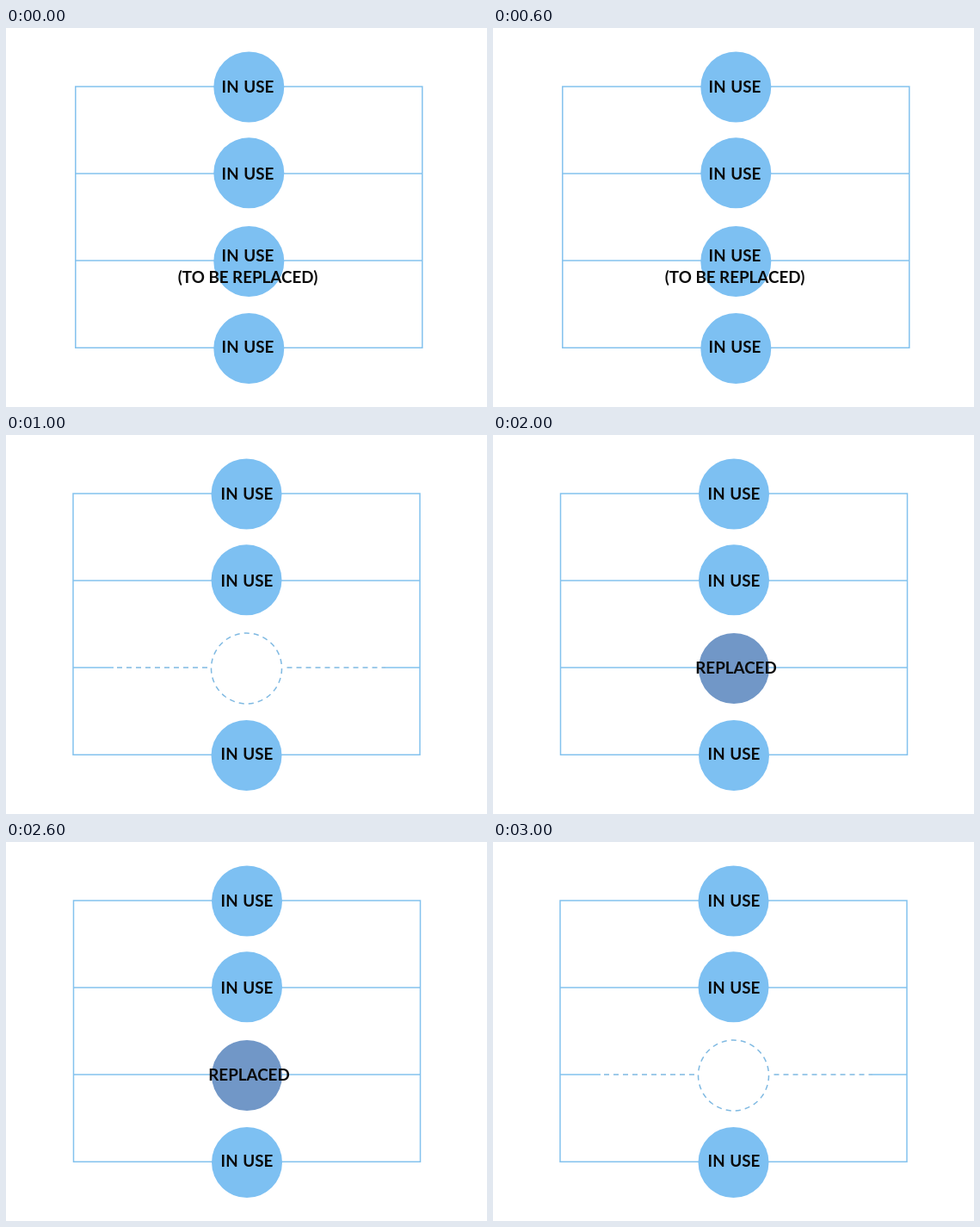
Write an HTML page that moves like this. It is 559 px wide and 440 px high and loops after 4 s.

```html
<!DOCTYPE html>
<html lang="en">
<head>
<meta charset="utf-8">
<title>Replacing one of four units</title>
<style>
html, body { margin: 0; width: 100%; height: 100%; overflow: hidden; background: #fff; }
svg { display: block; }
.wire { fill: none; stroke: #83c2ee; stroke-width: 1.5; }
.dash { stroke: #7fb9e2; stroke-dasharray: 6 5; }
text { font: 700 18.8px Lato, Carlito, sans-serif; text-anchor: middle; fill: #0a0a0a; }
.use { word-spacing: 1.2px; }
</style>
</head>
<body>
<svg id="stage" width="559" height="440" viewBox="0 0 559 440"></svg>
<script>
const stage = document.getElementById("stage");
const BLUE = "#7dc0f2", DARK = "#7197c7", R = 41;
const wires = [68, 169, 270, 371.3];
const centers = [68.5, 168.3, 271, 372];
const labels = [74.8, 175.8, 0, 376.8];

const wire = (d, extra = "") => `<path class="wire ${extra}" d="${d}"/>`;
const disc = (x, y, fill) => `<circle cx="${x}" cy="${y}" r="${R}" fill="${fill}"/>`;
const label = (x, y, s) => `<text class="${s === "IN USE" ? "use" : ""}" x="${x}" y="${y}">${s}</text>`;

// mid: center of the diagram, textX: center of the labels
function diagram(mid, textX, state) {
  const left = mid - 201.5, right = mid + 201.5;
  const empty = state === "empty";
  let out = wire(`M${left} 68H${right}V371.3H${left}Z`);
  out += wire(`M${left} 169H${right}`);
  if (empty) {
    out += wire(`M${left} 270H${left + 47}M${right - 40} 270H${right}`);
    out += wire(`M${left + 51} 270H${mid - R}M${mid + R + 6} 270H${right - 40}`, "dash");
    out += `<circle class="wire dash" cx="${mid}" cy="271" r="${R}" pathLength="253"/>`;
  } else {
    out += wire(`M${left} 270H${right}`);
    out += disc(mid, centers[2], state === "old" ? BLUE : DARK);
  }
  for (const i of [0, 1, 3])
    out += disc(mid, centers[i], BLUE) + label(textX, labels[i], "IN USE");
  if (state === "old")
    out += label(textX, 271.3, "IN USE") + label(textX, 296.3, "(TO BE REPLACED)");
  if (state === "new")
    out += label(282.5, 276.8, "REPLACED");
  return out;
}

const gap = diagram(279.5, 280, "empty");
const scenes = [diagram(282.3, 281, "old"), gap, diagram(280, 280, "new"), gap];
let shown = -1;

function draw() {
  const i = Math.floor(performance.now() / 1000) % scenes.length;
  if (i !== shown) stage.innerHTML = scenes[shown = i];
  requestAnimationFrame(draw);
}
draw();
</script>
</body>
</html>
```
